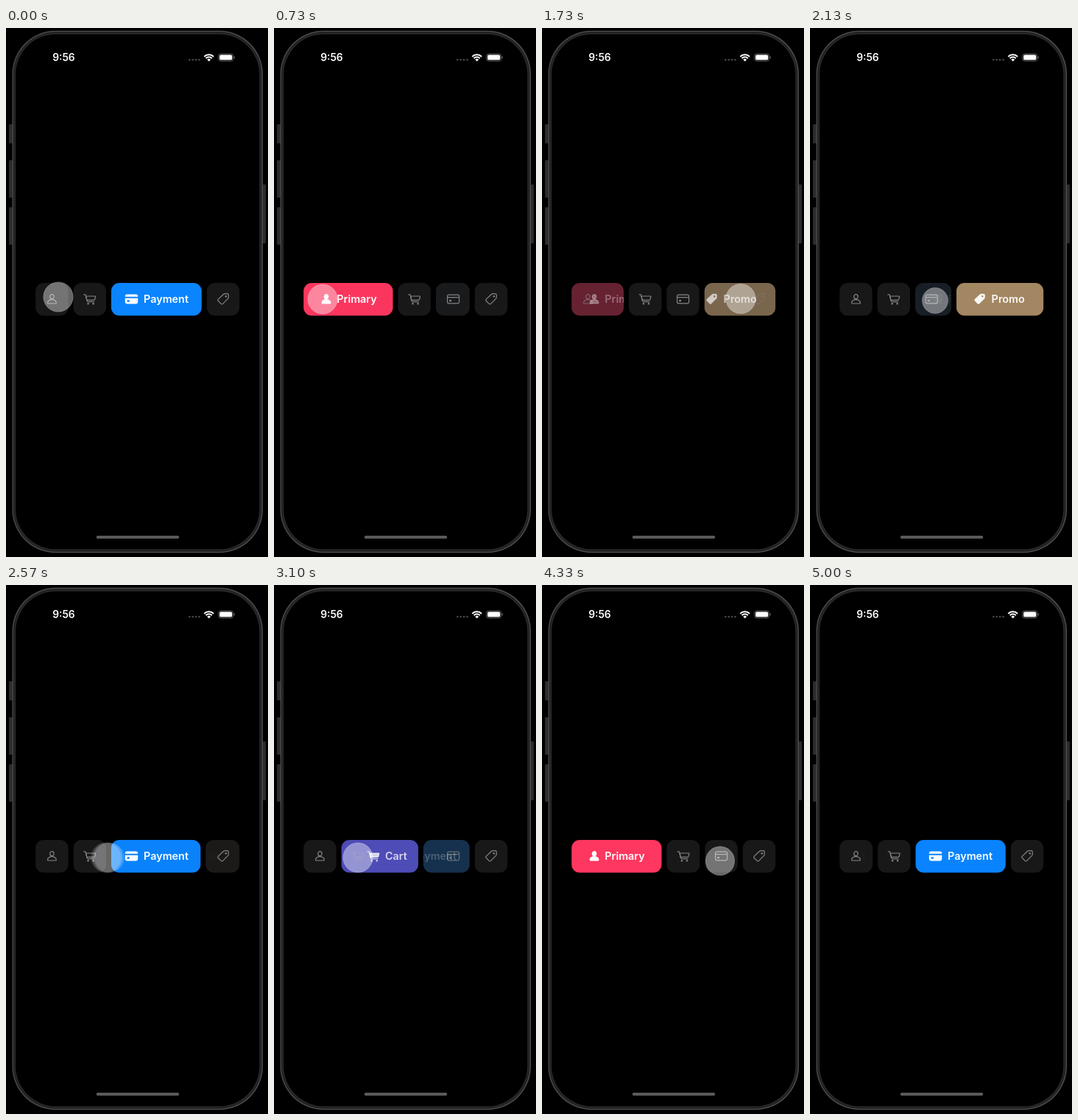
Animation of 356x720 px, one loop 5.03 s. Source, as an HTML page with a canvas:

```html
<!DOCTYPE html>
<html lang="en">
<head>
<meta charset="utf-8">
<title>Expanding tabs</title>
<style>
html, body { margin: 0; width: 100%; height: 100%; overflow: hidden; background: #000; }
canvas { display: block; width: 356px; height: 720px; }
</style>
</head>
<body>
<canvas id="stage"></canvas>
<script>
const W = 356, H = 720, LOOP = 5030;
const canvas = document.getElementById('stage');
const ctx = canvas.getContext('2d');
const dpr = window.devicePixelRatio || 1;
canvas.width = W * dpr;
canvas.height = H * dpr;

const FONT = 'Inter, Roboto, "Liberation Sans", sans-serif';
const LEFT = 40.2, SMALL = 44.4, WIDE = 122.8, GAP = 7;
const TOP = 347, TALL = 44.5, MID = 369;
const DARK = [24, 24, 24];

const tabs = [
  { label: 'Primary', color: [255, 55, 95], icon: person, iconX: 71, textX: 85.3 },
  { label: 'Cart', color: [94, 92, 230], icon: cart, iconX: 135, textX: 151 },
  { label: 'Payment', color: [10, 132, 255], icon: card, iconX: 170.5, textX: 187 },
  { label: 'Promo', color: [172, 142, 104], icon: tag, iconX: 230.5, textX: 246.6 }
];

// [time, tab that becomes active]
const START_TAB = 2;
const taps = [[260, 0], [1550, 3], [2100, 2], [2880, 1], [3765, 0], [4430, 2]];

// touch moves: [start, end, x, y]
const moves = [
  [0, 130, 66, 369], [760, 1330, 270, 368.5], [1790, 2030, 170, 371],
  [2440, 2680, 114, 371], [3270, 3600, 64, 376.5], [3830, 4270, 242, 375.5]
];

const lerp = (a, b, p) => a + (b - a) * p;
const clamp = v => Math.min(1, Math.max(0, v));
const smooth = v => { v = clamp(v); return v * v * (3 - 2 * v); };
const mix = (a, b, p) => `rgb(${a.map((v, i) => Math.round(lerp(v, b[i], p)))})`;
const spring = ms => {
  const w = Math.max(0, ms) * 0.01257;
  return 1 - (1 + w) * Math.exp(-w);
};

function box(x, y, w, h, r, fill) {
  ctx.beginPath();
  ctx.roundRect(x, y, w, h, r);
  ctx.fillStyle = fill;
  ctx.fill();
}

function disc(x, y, r) {
  ctx.beginPath();
  ctx.arc(x, y, r, 0, 7);
  ctx.fill();
}

const shoulders = new Path2D('M-5.9 4.9C-5.9 1.9-2.6.7 0 .7S5.9 1.9 5.9 4.9Q5.9 6 4.8 6H-4.8Q-5.9 6-5.9 4.9Z');
const handle = new Path2D('M-8-6.2H-6.4Q-5.7-6.2-5.5-5.4L-3.6 2.7Q-3.4 3.7-2.4 3.7H5.8');
const basket = new Path2D('M-5.2-4H7.1Q7.9-4 7.7-3.2L6.8.4Q6.6 1.3 5.7 1.3H-4Z');
const tagBody = new Path2D('M.4-6.5Q1.3-7.3 2.4-7.3H5.6Q7.3-7.3 7.3-5.6V-2.6Q7.3-1.5 6.5-.6L-.4 6.3Q-1.6 7.5-2.8 6.3L-6.6 2.5Q-7.8 1.3-6.6.1Z');
const hole = new Path2D();
hole.arc(3.8, -3.8, 1.2, 0, 7);
const tagFull = new Path2D(tagBody);
tagFull.addPath(hole);

function person(full) {
  const head = new Path2D();
  head.ellipse(0, -3.3, 2.7, 3, 0, 0, 7);
  for (const part of [head, shoulders]) {
    if (full) ctx.fill(part);
    ctx.stroke(part);
  }
}

function cart(full) {
  ctx.stroke(handle);
  if (full) ctx.fill(basket);
  ctx.stroke(basket);
  disc(-2.2, 6.2, 1.2);
  disc(4.8, 6.2, 1.2);
}

function card(full) {
  ctx.beginPath();
  if (full) {
    ctx.roundRect(-8.7, -6.4, 17.4, 12.8, 2.4);
    ctx.rect(-8.7, -3.3, 17.4, 2);
    ctx.roundRect(-6, 1.3, 3.4, 2.5, 0.6);
    ctx.fill('evenodd');
    return;
  }
  ctx.roundRect(-8, -5.8, 16, 11.6, 2);
  ctx.moveTo(-8, -2.4);
  ctx.lineTo(8, -2.4);
  ctx.stroke();
  ctx.fillRect(-5.4, 1, 2.8, 2.3);
}

function tag(full) {
  if (full) return ctx.fill(tagFull, 'evenodd');
  ctx.stroke(tagBody);
  ctx.fill(hole);
}

function drawIcon(tab, x, full, alpha) {
  ctx.save();
  ctx.translate(x, MID);
  ctx.globalAlpha = alpha;
  ctx.fillStyle = ctx.strokeStyle = full ? '#fff' : '#858585';
  ctx.lineWidth = 1.2;
  ctx.lineCap = ctx.lineJoin = 'round';
  tab.icon(full);
  ctx.restore();
}

function drawText(text, x, y, size) {
  ctx.font = `600 ${size}px ${FONT}`;
  ctx.fillStyle = '#fff';
  ctx.fillText(text, x, y);
}

function slot(i, active) {
  return {
    x: LEFT + i * (SMALL + GAP) + (i > active ? WIDE - SMALL : 0),
    w: i === active ? WIDE : SMALL
  };
}

function drawTabs(t) {
  let from = START_TAB, to = START_TAB, p = 1;
  for (const [at, i] of taps) {
    if (t < at) break;
    from = to;
    to = i;
    p = spring(t - at);
  }
  tabs.forEach((tab, i) => {
    const a = slot(i, from), b = slot(i, to);
    const x = lerp(a.x, b.x, p), w = lerp(a.w, b.w, p);
    const on = (i === to ? p : 0) + (i === from ? 1 - p : 0);
    box(x, TOP, w, TALL, 11, mix(DARK, tab.color, on));
    ctx.save();
    ctx.clip();
    if (on < 1) {
      // a changing tab keeps its plain icon at its resting place
      const rest = i === to ? a.x : i === from ? b.x : x;
      drawIcon(tab, rest + SMALL / 2, false, 1 - on);
    }
    if (on > 0) {
      drawIcon(tab, tab.iconX, true, on);
      ctx.globalAlpha = on;
      drawText(tab.label, tab.textX, 374, 14.4);
    }
    ctx.restore();
  });
}

function touchAt(t) {
  let x = 71, y = 366;
  for (const [a, b, nx, ny] of moves) {
    const p = smooth((t - a) / (b - a));
    x = lerp(x, nx, p);
    y = lerp(y, ny, p);
  }
  return { x, y };
}

function drawTouch(t) {
  const alpha = 0.4 * (1 - smooth((t - 4640) / 250));
  if (alpha <= 0) return;
  let press = 0;
  for (const [at] of taps) {
    const down = smooth((t - at + 120) / 80), up = smooth((t - at) / 120);
    press = Math.max(press, down * (1 - up));
  }
  const r = 20.5 - 3.2 * press;
  const now = touchAt(t), before = touchAt(Math.max(0, t - 16));
  const moving = Math.hypot(now.x - before.x, now.y - before.y) > 0.8;
  const n = moving ? 6 : 1;
  const each = 1 - Math.pow(1 - alpha, 1 / n);
  ctx.fillStyle = `rgba(255,255,255,${each})`;
  for (let k = 0; k < n; k++) {
    const q = n > 1 ? k / (n - 1) - 0.5 : 0;
    disc(now.x + (now.x - before.x) * q, now.y + (now.y - before.y) * q, r);
  }
  if (!moving) {
    ctx.strokeStyle = `rgba(255,255,255,${alpha * 0.25})`;
    ctx.lineWidth = 1;
    ctx.beginPath();
    ctx.arc(now.x, now.y, r - 0.5, 0, 7);
    ctx.stroke();
  }
}

function drawPhone() {
  for (const [y, h] of [[131, 26], [180, 51], [244, 51]]) box(4, y, 5, h, 1, '#2c2c2c');
  box(348, 213, 5, 80, 1, '#2c2c2c');
  box(8.5, 3.8, 340.5, 710.4, 59, '#505050');
  box(9.7, 5, 338, 708, 58, '#222');
  box(12.2, 7.6, 333, 702.8, 55.5, '#303030');
  box(13, 8.4, 331.4, 701.2, 54.8, '#000');
}

function drawStatus() {
  drawText('9:56', 63.2, 45, 13.8);
  ctx.fillStyle = '#484848';
  for (let i = 0; i < 4; i++) disc(249.3 + i * 4.4, 43.3, 1.3);

  // wifi fan
  ctx.strokeStyle = ctx.fillStyle = '#fff';
  ctx.lineWidth = 2;
  ctx.lineCap = 'butt';
  for (const r of [9, 5.8]) {
    ctx.beginPath();
    ctx.arc(275.7, 45.3, r, -Math.PI * 0.75, -Math.PI * 0.25);
    ctx.stroke();
  }
  ctx.beginPath();
  ctx.moveTo(275.7, 45.4);
  ctx.arc(275.7, 45.4, 3.4, -Math.PI * 0.75, -Math.PI * 0.25);
  ctx.fill();

  // battery
  ctx.strokeStyle = '#686868';
  ctx.lineWidth = 0.9;
  ctx.beginPath();
  ctx.roundRect(288.7, 35.2, 20, 9.8, 3);
  ctx.stroke();
  box(290.1, 36.6, 17.2, 7, 1.9, '#fff');
  box(309.7, 38.6, 1.2, 3, 0.6, '#686868');

  box(122.7, 691, 112.6, 4, 2, '#5a5a5a');
}

function frame(now) {
  const t = now % LOOP;
  ctx.setTransform(dpr, 0, 0, dpr, 0, 0);
  ctx.fillStyle = '#000';
  ctx.fillRect(0, 0, W, H);
  drawPhone();
  drawStatus();
  drawTabs(t);
  drawTouch(t);
}

const begin = performance.now();
function tick() {
  frame(performance.now() - begin);
  requestAnimationFrame(tick);
}
tick();
</script>
</body>
</html>
```
